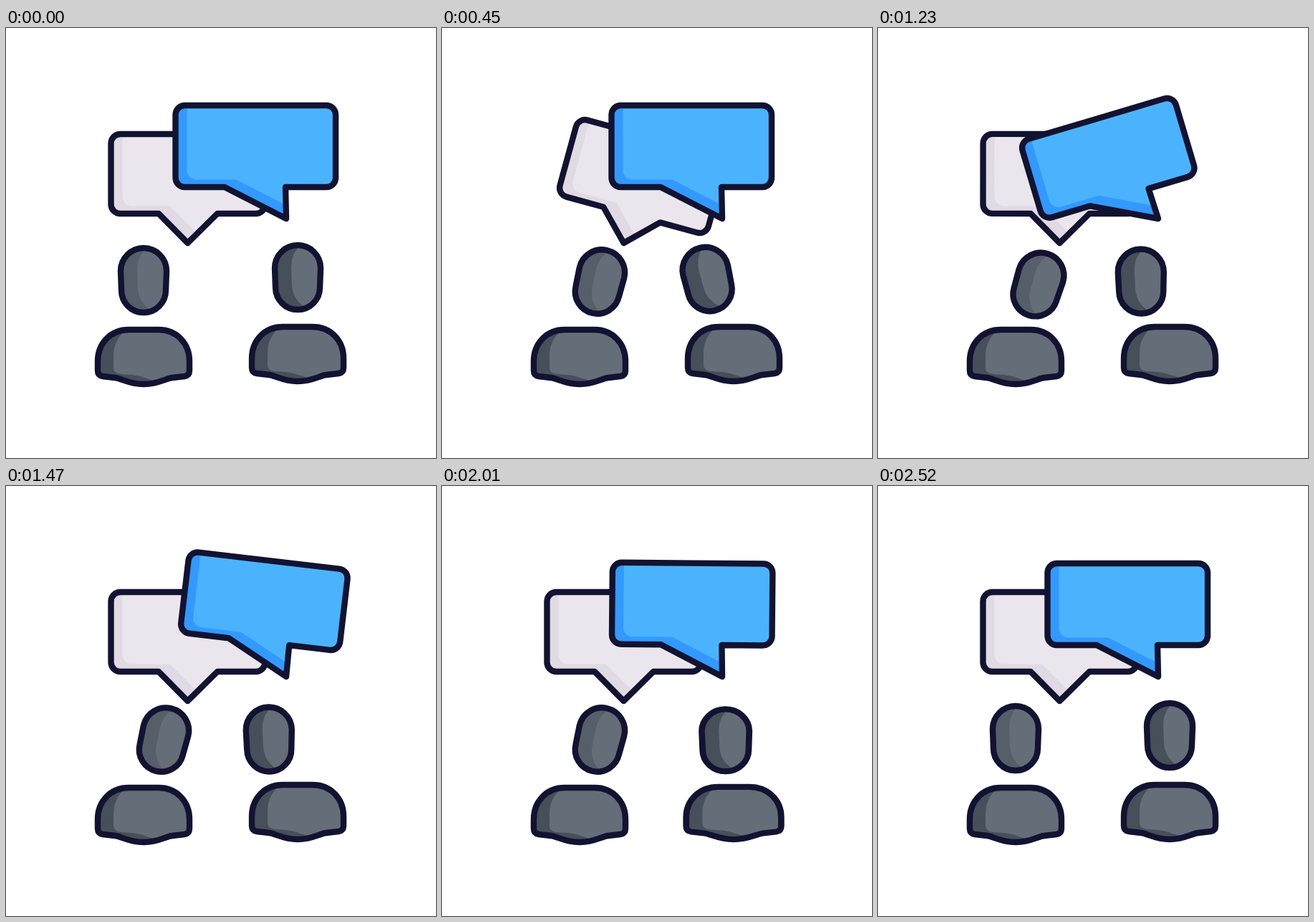
An HTML page with a canvas that plays this animation: 600x600 px, repeating every 4550 ms.

```html
<!DOCTYPE html>
<html lang="en">
<head>
<meta charset="utf-8">
<title>Conversation</title>
<style>
  html, body { margin: 0; width: 100%; height: 100%; overflow: hidden; background: #fff; }
  canvas { display: block; }
</style>
</head>
<body>
<canvas id="stage" width="600" height="600"></canvas>
<script>
const ctx = document.getElementById('stage').getContext('2d');
const LOOP = 4550, STEP = 30, END = 2520;
const INK = '#121331', GREY = '#656d79', DARK = '#464f5a', MID = '#565f69';

// Eased 0 to 1, and a smooth rise and fall.
const ease = (t, start, span) => {
  const u = Math.min(Math.max((t - start) / span, 0), 1);
  return u * u * (3 - 2 * u);
};
const bump = (t, start, span) =>
  t > start && t < start + span ? Math.sin(Math.PI * (t - start) / span) ** 2 : 0;

// A bubble is built around the tip of its tail, with a shaded strip left and below.
function bubble(left, top, right, bottom, tailLeft, tailRight, shade, fill) {
  const r = 13, mid = (left + right) / 2;
  const outline = new Path2D();
  outline.moveTo(mid, top);
  outline.arcTo(right, top, right, bottom, r);
  outline.arcTo(right, bottom, tailRight, bottom, r);
  outline.lineTo(tailRight, bottom);
  outline.lineTo(0, 0);
  outline.lineTo(tailLeft, bottom);
  outline.arcTo(left, bottom, left, top, r);
  outline.arcTo(left, top, mid, top, r);
  outline.closePath();

  const x = left + 16, y = bottom - 10.5, bend = tailLeft + 16;
  const light = new Path2D();
  light.moveTo(x, top);
  light.arcTo(x, y, bend, y, r);
  light.lineTo(bend, y);
  light.lineTo(bend - tailLeft, y - bottom);
  light.lineTo(right, y - bottom);
  light.lineTo(right, top);
  return { outline, light, shade, fill };
}

const bubbles = [
  { x: 253.5, y: 300, start: 0, lead: 145,
    look: bubble(-107, -152, 108, -41, -40.5, 41.5, '#e0dae4', '#ebe6ed') },
  { x: 391, y: 266, start: 1110, lead: 175,
    look: bubble(-154.5, -158, 69, -44, -86, -1, '#3399ff', '#4bb3fd') }
];

// Each swing turns back after one beat and loses the same angle.
function swing(t, { start, lead }) {
  const beat = 275, turns = 5, loss = 5.4;
  const tau = t - start;
  const phase = tau < lead ? Math.max(tau / lead, 0) : 1 + (tau - lead) / beat;
  const peak = n => n > 0 && n < turns ? (-1) ** n * loss * (turns - n) : 0;
  const n = Math.floor(phase);
  return peak(n) + (peak(n + 1) - peak(n)) * ease(phase, n, 1);
}

const headLook = shade => ({
  outline: new Path2D('M-32-13A32 32 0 0 1 32-13L31 14A31 31 0 0 1-31 14Z'),
  light: new Path2D('M8-46C-4-41-9-28-9-13L-8 12C-7 26 2 38 13 43L45 50V-55Z'),
  shade, fill: GREY
});
const bodyLook = {
  outline: new Path2D('M-64-35C-64-60-46-79-21-79H21C46-79 64-60 64-35V-22Q64-15 57-14L40-12' +
    'C31-11 20-3 0-3C-20-3-31-11-40-12L-57-14Q-64-15-64-22Z'),
  light: new Path2D('M-20-81C-34-73-42-60-42-42V-26Q-42-18-32-17L-16-16C-2-14 8-10 20-5L70 4V-85Z'),
  shade: DARK, fill: GREY
};

// lean and nod are head offsets: x, y, degrees.
const people = [
  { x: 192, base: 500, head: headLook(MID), start: 0, back: 2010,
    lean: [28, 2, 13.5], nod: [5, 5.5, 5], nodAt: t => bump(t, 660, 840) },
  { x: 407, base: 496, head: headLook(DARK), start: 90, back: 1800,
    lean: [-36.5, 2.5, -13], nod: [-3.5, 3, 12], nodAt: t => ease(t, 870, 300) }
];

function paint({ outline, light, shade, fill }, x, y, deg = 0) {
  ctx.save();
  ctx.translate(x, y);
  ctx.rotate(deg * Math.PI / 180);
  ctx.fillStyle = shade;
  ctx.fill(outline);
  ctx.save();
  ctx.clip(outline);
  ctx.fillStyle = fill;
  ctx.fill(light);
  ctx.restore();
  ctx.strokeStyle = INK;
  ctx.lineWidth = 8.4;
  ctx.lineJoin = 'round';
  ctx.stroke(outline);
  ctx.restore();
}

function drawPerson(p, t) {
  const amount = ease(t, p.start, 320) - ease(t, p.back, 320);
  const [dx, dy, deg] = p.lean.map((v, i) => amount * (v + p.nod[i] * p.nodAt(t)));
  const squash = 0.055 * (bump(t, p.start, 300) + bump(t, p.back, 300));
  ctx.save();
  ctx.translate(p.x, p.base);
  ctx.scale(1 + squash, 1 - squash);
  paint(bodyLook, 0, 0);
  paint(p.head, dx, dy - 148, deg);
  ctx.restore();
}

function draw(t) {
  ctx.fillStyle = '#fff';
  ctx.fillRect(0, 0, 600, 600);
  bubbles.forEach(b => paint(b.look, b.x, b.y, swing(t, b)));
  people.forEach(p => drawPerson(p, t));
}

const begin = performance.now();
function tick() {
  const t = (performance.now() - begin) % LOOP;
  draw(Math.min(Math.floor(t / STEP) * STEP, END));
  requestAnimationFrame(tick);
}
tick();
</script>
</body>
</html>
```
